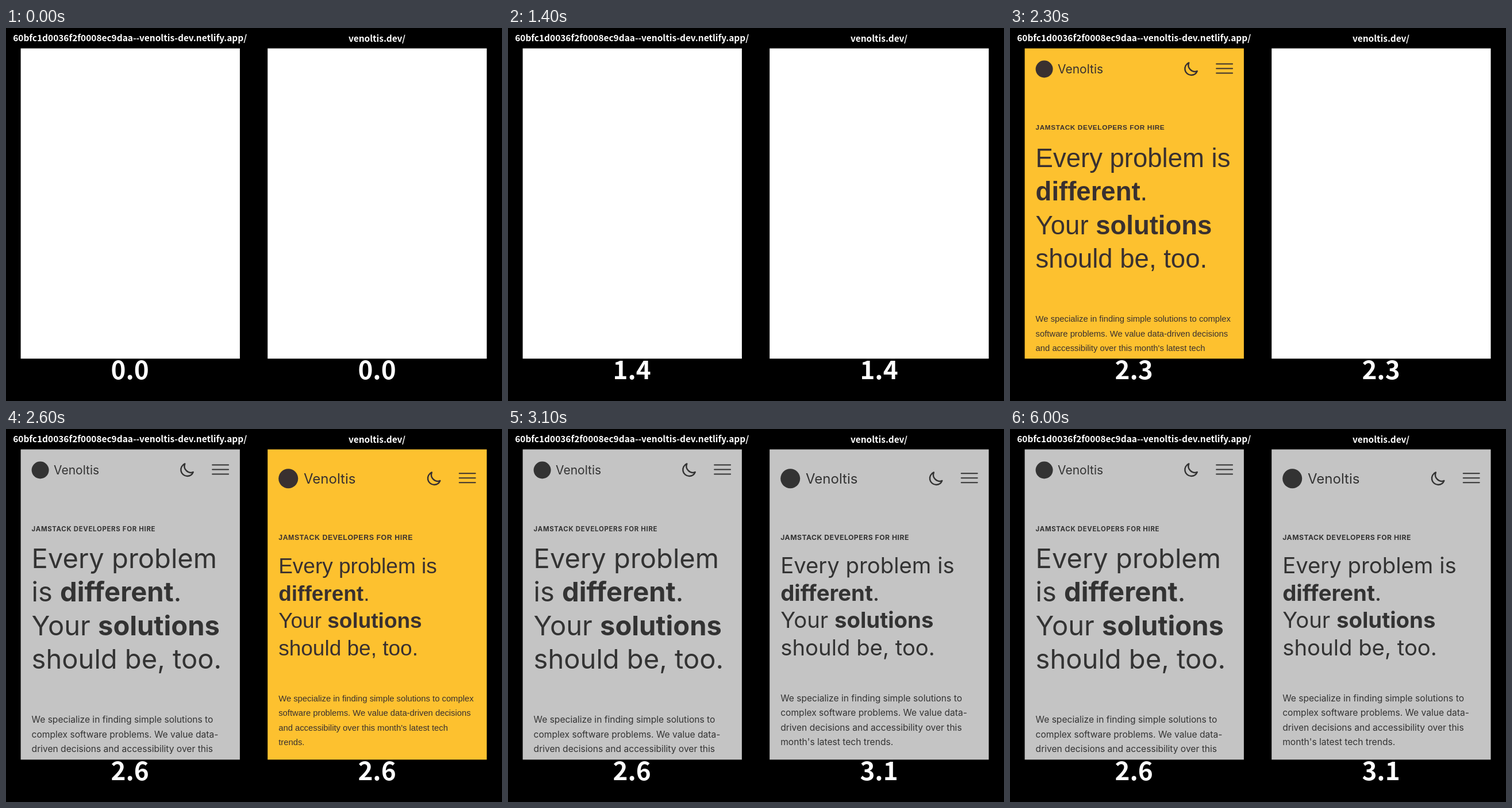
Recreate the animation shown at these times as an HTML page. Size 863 by 649 pixels, loop 6100 ms.

```html
<!DOCTYPE html>
<html lang="en">
<head>
<meta charset="utf-8">
<title>Page load comparison</title>
<style>
  html, body { margin: 0; height: 100%; overflow: hidden; background: #000; }
  svg { display: block; width: 863px; height: 649px; }
  text { white-space: pre; font-optical-sizing: none; }
  .label, .clock {
    fill: #fff; text-anchor: middle;
    font: 700 15.45px "Noto Sans CJK JP", "Noto Sans CJK SC", "Noto Sans CJK", sans-serif;
  }
  .clock { font-size: 44px; }
  .fallback { font-family: "Liberation Sans", Arial, sans-serif; }
  .webfont, .brand { font-family: Inter, sans-serif; }
  .first { --paper: #fdc12f; --ink: #393030; }
  .done { --paper: #c4c4c4; --ink: #333; }
  .page { fill: var(--ink); }
  .paper { fill: var(--paper); }
  .icon { fill: none; stroke: var(--ink); stroke-width: 2; stroke-linecap: round; stroke-linejoin: round; }
  .bold { font-weight: 700; }
</style>
</head>
<body>
<svg id="stage" viewBox="0 0 863 649"></svg>
<script>
const LOOP = 6100, TOP = 35.5, WIDTH = 381.3, HEIGHT = 539.8;
const stage = document.getElementById('stage');

const bold = s => `<tspan class="bold">${s}</tspan>`;
const body = {
  first: ['We specialize in finding simple solutions to complex',
    'software problems. We value data-driven decisions',
    "and accessibility over this month's latest tech", 'trends.'],
  done: ['We specialize in finding simple solutions to',
    'complex software problems. We value data-',
    'driven decisions and accessibility over this', "month's latest tech trends."]
};
const ending = [`Your ${bold('solutions')}`, 'should be, too.'];
const wide = ['Every problem is', `${bold('different')}.`, ...ending];
const narrow = ['Every problem', `is ${bold('different')}.`, ...ending];

// kicker: [baseline, size, letter spacing]; title: [size, lines]; times in tenths of a second
const panels = [
  { x: 25.6, center: 215.7, url: '60bfc1d0036f2f0008ec9daa--venoltis-dev.netlify.app/', urlY: 23,
    paint: 20, finish: 26, headY: 71.5, logo: 15, brand: [83, 79, 21], moonY: 56,
    titleY: 242, titleStep: 58.4, bodyY: 511,
    first: { kicker: [177, 11.8, .59], title: [45.5, wide] },
    done: { kicker: [178, 11.4, .7], title: [47.1, narrow] } },
  { x: 455.2, center: 645.5, url: 'venoltis.dev/', urlY: 24,
    paint: 25, finish: 31, headY: 86.3, logo: 17, brand: [518, 94.5, 24], moonY: 71,
    titleY: 251, titleStep: 47.6, bodyY: 473.5,
    first: { kicker: [193, 12.3, .6], title: [37, wide] },
    done: { kicker: [193, 12.2, .5], title: [38.3, wide] } }
];

const text = (x, y, size, s, extra = '') =>
  `<text x="${x}" y="${y}" font-size="${size}" ${extra}>${s}</text>`;
const lines = (x, y, step, size, list) =>
  list.map((s, i) => text(x, y + i * step, size, s)).join('');

function header(p) {
  const [bx, by, size] = p.brand;
  const bars = [-1, 0, 1].map(i => `M${p.x + 333.5} ${p.headY - 1 + i * 8}h28`).join('');
  return `<circle cx="${p.x + 19 + p.logo}" cy="${p.headY}" r="${p.logo}"/>
    ${text(bx, by, size, 'Venoltis', 'class="brand"')}
    <path class="icon" transform="translate(${p.x + 275} ${p.moonY}) scale(1.233)"
      d="M20.354 15.354A9 9 0 0 1 8.646 3.646 9 9 0 0 0 12 21a9 9 0 0 0 8.354-5.646z"/>
    <path class="icon" d="${bars}"/>`;
}

function page(p, state) {
  const { kicker: [ky, kSize, spacing], title: [size, title] } = p[state];
  const left = p.x + 19;
  const font = state === 'done' ? 'webfont' : 'fallback';
  return `${header(p)}<g class="${font}">
    ${text(left, ky, kSize, 'JAMSTACK DEVELOPERS FOR HIRE', `class="bold" letter-spacing="${spacing}"`)}
    ${lines(left, p.titleY, p.titleStep, size, title)}
    ${lines(left, p.bodyY, 25.5, state === 'done' ? 15.6 : 14.8, body[state])}</g>`;
}

function panel(p, i, tick) {
  const state = tick < p.paint ? '' : tick < p.finish ? 'first' : 'done';
  const box = `x="${p.x}" y="${TOP}" width="${WIDTH}" height="${HEIGHT}"`;
  return `<clipPath id="clip${i}"><rect ${box}/></clipPath>
    <text class="label" x="${p.center}" y="${p.urlY}">${p.url}</text>
    <g class="${state}">
      <rect ${box} ${state ? 'class="paper"' : 'fill="#fff"'}/>
      <g class="page" clip-path="url(#clip${i})">${state && page(p, state)}</g>
    </g>
    <text class="clock" x="${p.center}" y="611">${(Math.min(tick, p.finish) / 10).toFixed(1)}</text>`;
}

let shown = -1;
function draw() {
  const tick = Math.floor(performance.now() % LOOP / 100);
  if (tick !== shown) {
    shown = tick;
    stage.innerHTML = panels.map((p, i) => panel(p, i, tick)).join('');
  }
  requestAnimationFrame(draw);
}
draw();
</script>
</body>
</html>
```
